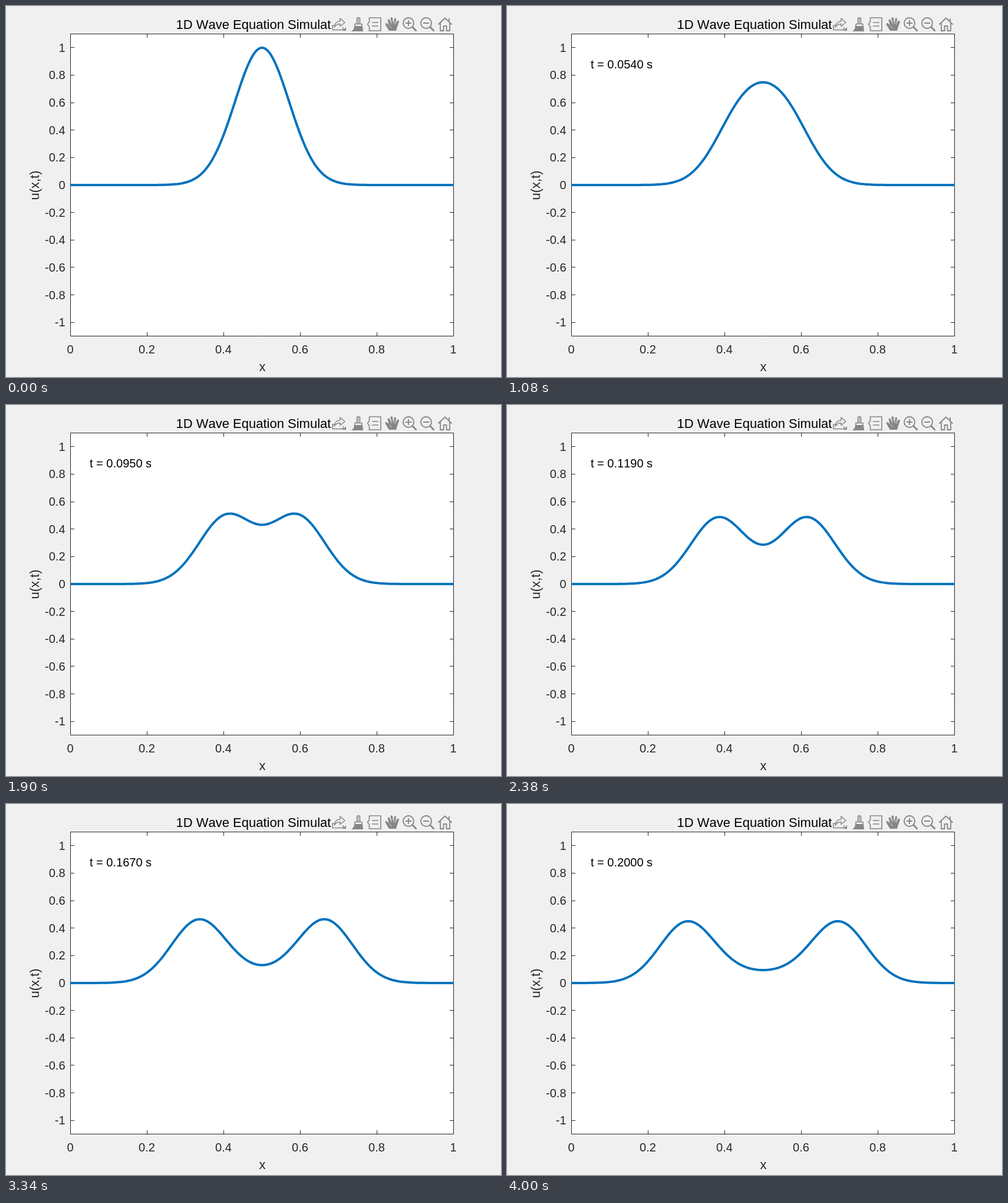
Write an HTML page with a canvas that moves like this. It is 840 px wide and 630 px high and loops after 4.02 s.

```html
<!DOCTYPE html>
<html lang="en">
<head>
<meta charset="utf-8">
<title>1D wave equation</title>
<style>
html, body { margin: 0; height: 100%; overflow: hidden; background: #f0f0f0; }
canvas { display: block; }
</style>
</head>
<body>
<canvas id="stage" width="840" height="630"></canvas>
<script>
const g = document.getElementById('stage').getContext('2d');
const LOOP = 4020, STEP = 20, FRAMES = 201;
const L = 109.5, R = 759.5, T = 47.5, B = 560.5;
const px = x => L + (R - L) * x;
const py = u => (T + B) / 2 - u * (B - T) / 2.2;

// Damped wave equation u_tt + 2 u_t = u_xx, fixed ends, leapfrog scheme
function solve() {
  const n = 200, dt = 0.001, damp = dt, r = (dt * n) ** 2;
  const lap = (u, i) => u[i - 1] - 2 * u[i] + u[i + 1];
  const inner = (u, f) => u.map((v, i) => i && i < n ? f(v, i) : 0);
  let prev = Array.from({ length: n + 1 }, (_, i) => Math.exp(-100 * (i / n - 0.5) ** 2));
  let cur = inner(prev, (v, i) => v + r / 2 * lap(prev, i));
  const waves = [prev];
  while (waves.length < FRAMES) {
    const next = inner(cur, (v, i) =>
      (2 * v - (1 - damp) * prev[i] + r * lap(cur, i)) / (1 + damp));
    prev = cur;
    cur = next;
    waves.push(cur);
  }
  return waves;
}
const waves = solve();

function text(s, x, y, size, align = 'left', color = '#262626') {
  g.font = `${size}px "Liberation Sans", Arial, sans-serif`;
  g.textAlign = align;
  g.fillStyle = color;
  g.fillText(s, x, y);
}

function line(d, width, color) {
  g.lineWidth = width;
  g.strokeStyle = color;
  g.stroke(new Path2D(d));
}

function axes() {
  g.fillStyle = '#fff';
  g.fillRect(L, T, R - L, B - T);
  let d = `M${L} ${T}H${R}V${B}H${L}Z`;
  for (let i = 0; i <= 5; i++) {
    const x = Math.floor(px(i / 5)) + 0.5;
    d += `M${x} ${B}v-6.5M${x} ${T}v6.5`;
    text(String(i / 5), x - 0.5, 590, 20, 'center');
  }
  for (let i = -5; i <= 5; i++) {
    const y = Math.floor(py(i / 5)) + 0.5;
    d += `M${L} ${y}h6.5M${R} ${y}h-6.5`;
    text(String(i / 5), 100.5, Math.round(py(i / 5)) + 7, 20, 'right');
  }
  line(d, 1, '#262626');
  text('x', 435, 620, 22, 'center');
  g.save();
  g.translate(55.5, 304.5);
  g.rotate(-Math.PI / 2);
  text('u(x,t)', 0, 0, 22, 'center');
  g.restore();
  text('1D Wave Equation Simulat', 288.5, 39, 22, 'left', '#000');
}

function toolbar() {
  const gray = '#868686';
  const fill = d => { g.fillStyle = gray; g.fill(new Path2D(d)); };
  const ink = (d, w = 1.7) => line(d, w, gray);
  g.lineJoin = 'round';
  // export
  ink('M557 33H554V40.5H572V36M557 36C558 29 562 26 567 26V21L575 28L567 34.5V30.5C562 30.5 559 33 557 36Z', 1.5);
  fill('M577 36V42H571Z');
  // brush
  ink('M595.5 30V21Q595.5 20 597 20H599Q600.5 20 600.5 21V30M592 30.5H604V35H592Z', 1.6);
  fill('M591 34H605L606 43H586Q591 40 591 34Z');
  ink('M598 20V30', 1.2);
  // data tip
  ink('M616.5 20H636V42H616.5V35L613.5 31L616.5 27ZM621 28H632M621 34H632');
  // hand
  fill('M650 42L644 32Q643 29.5 645 29Q647 29 650 33L647.5 24Q648 21.5 650.5 23L653 29L652.5 20.5Q654.5 18 656 20.5L657 29L659 21Q661.5 19.5 662 22L661 30L664 25Q667 24 667 26.5L663.5 37L662 42Z');
  line('M651 33L654 38M654 24V31M658.3 24V31M662 26L660.5 32', 0.8, '#e4e4e4');
  // zoom in, zoom out
  for (const x of [683, 713]) {
    ink(`M${x + 9} 29a9 9 0 1 1 -18 0a9 9 0 1 1 18 0M${x - 5} 29h10` + (x < 700 ? `M${x} 24v10` : ''), 1.9);
    ink(`M${x + 6.5} 35.5l7 7`, 2.8);
  }
  // home
  ink('M733.5 31.5L745 20.5L756.5 31.5M737 29V42H742.5V34H747.5V42H753V29M752 26V21', 1.8);
}

function draw(now) {
  const n = Math.floor((now % LOOP) / STEP);
  g.fillStyle = '#f0f0f0';
  g.fillRect(0, 0, 840, 630);
  g.fontKerning = 'none';
  axes();
  toolbar();
  g.save();
  g.beginPath();
  g.rect(109, 47, 651, 514);
  g.clip();
  const u = waves[n];
  line('M' + u.map((v, i) => `${px(i / (u.length - 1))} ${py(v)}`).join('L') + 'h1', 4, '#0072bd');
  g.restore();
  if (n) text(`t = ${(n / 1000).toFixed(4)} s`, 142, 106, 20, 'left', '#000');
}

const start = performance.now();
function tick() {
  draw(performance.now() - start);
  requestAnimationFrame(tick);
}
tick();
</script>
</body>
</html>
```
